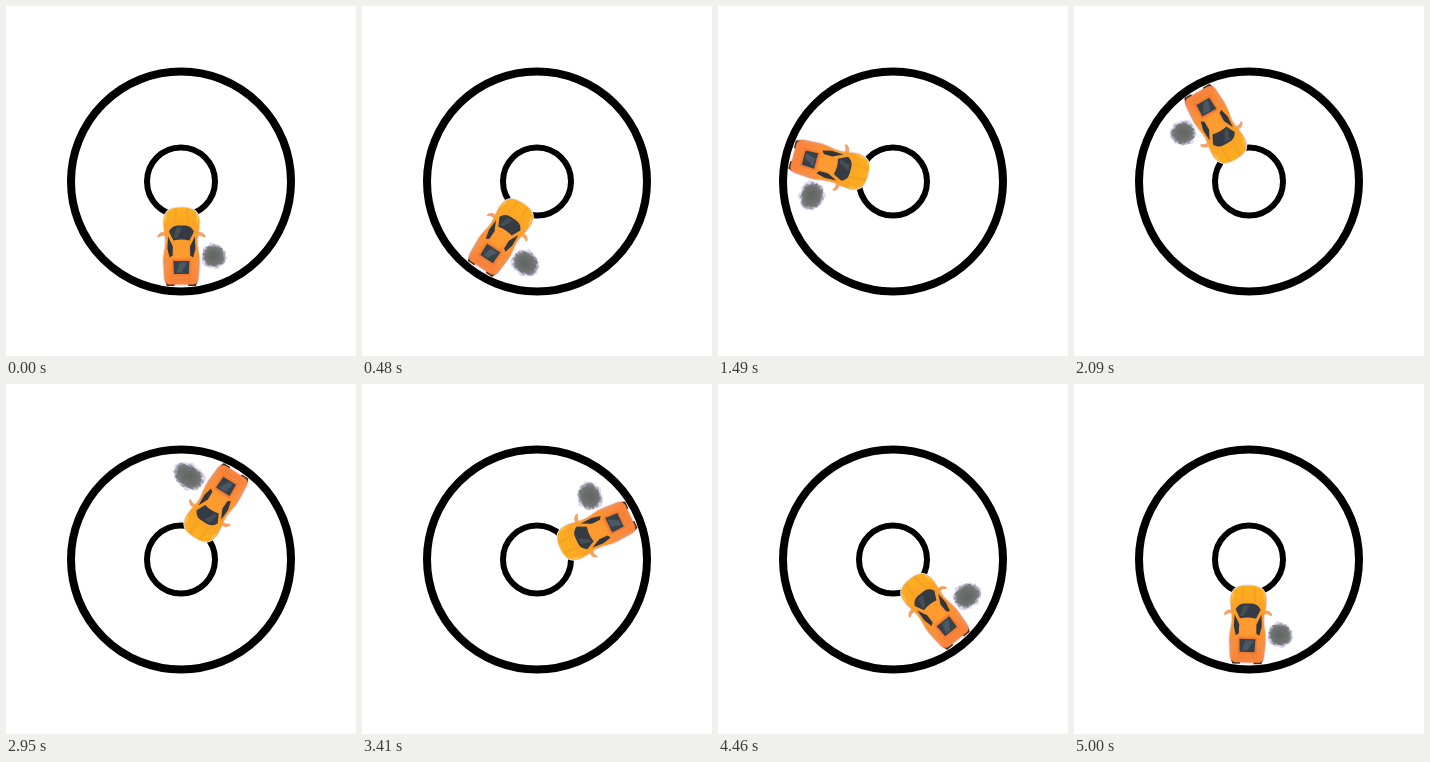
Write an HTML page with a canvas that moves like this. It is 350 px wide and 350 px high and loops after 5040 ms.

```html
<!DOCTYPE html>
<html>
<head>
<meta charset="utf-8">
<style>
html, body { margin: 0; width: 100%; height: 100%; overflow: hidden; background: #fff; }
canvas { display: block; width: 350px; height: 350px; }
</style>
</head>
<body>
<canvas id="stage" width="350" height="350"></canvas>
<script>
const ctx = document.getElementById('stage').getContext('2d');
const LOOP = 5040;
const SPEED = 72; // degrees per second, one puff per second

// time in ms, heading in degrees
const turns = [[0, 0], [1010, 70], [1490, 105.2], [2090, 150.3],
               [2950, 212], [3920, 281.2], [5000, 361.5]];

function heading(t) {
  if (t >= 5000) return 361.5;
  const i = turns.findIndex(k => k[0] > t);
  const [t0, a0] = turns[i - 1], [t1, a1] = turns[i];
  return a0 + (a1 - a0) * (t - t0) / (t1 - t0);
}

function ring(r, width) {
  ctx.beginPath();
  ctx.arc(0, 0, r, 0, Math.PI * 2);
  ctx.lineWidth = width;
  ctx.strokeStyle = '#000';
  ctx.stroke();
}

function fill(path, color) {
  ctx.fillStyle = color;
  ctx.fill(new Path2D(path));
}

// draws a path and its mirror image across the car's long axis
function pair(path, color) {
  fill(path, color);
  ctx.save();
  ctx.scale(-1, 1);
  fill(path, color);
  ctx.restore();
}

const body = new Path2D(
  'M0 26 C6 26 11 27 14 30 C18 34 18.5 40 17.5 47 C17 53 15.5 57 16 62 ' +
  'C16.5 69 18.5 74 18 82 L17 97 C16.5 101 14 103 11 103 L-11 103 ' +
  'C-14 103 -16.5 101 -17 97 L-18 82 C-18.5 74 -16.5 69 -16 62 ' +
  'C-15.5 57 -17 53 -17.5 47 C-18.5 40 -18 34 -14 30 C-11 27 -6 26 0 26 Z');

const paint = ctx.createLinearGradient(0, 26, 0, 103);
paint.addColorStop(0, '#fcb01f');
paint.addColorStop(0.4, '#fc9c2a');
paint.addColorStop(1, '#fb823c');

function car() {
  ctx.lineWidth = 2;
  ctx.strokeStyle = '#e6dcf0';
  ctx.stroke(body);
  pair('M15 50 L21 51 L24 54 L23.5 56.5 L20 54.5 L15 54 Z', '#f2a266');
  pair('M6 100 L16 100 L14.5 104.5 L7 104.5 Z', '#4b3026');
  ctx.fillStyle = paint;
  ctx.fill(body);
  pair('M4 27 L7 27 L8 43 L5.5 43 Z', '#f4a322');
  pair('M14.5 31 L17 36 L17 43 L14.5 37 Z', '#fdbe48');
  pair('M16.2 77 L17.5 82 L16.8 97 L14.8 99 L14.2 82 Z', '#f19055');
  fill('M-12.5 50 C-9 43.5 -5 44 0 44 C5 44 9 43.5 12.5 50 L8 59 Q0 57 -8 59 Z', '#343b42');
  fill('M-5 46 L1 46 L-4 56 L-8 57 Z', '#454e56');
  pair('M13.4 55 L14 67 L11.8 76 L8.8 74 L8.6 65 Z', '#30363b');
  fill('M-8 60 Q0 58 8 60 L7 76 L-7 76 Z', '#fd9a30');
  fill('M-9.5 77.5 L9.5 77.5 L10 95 L-10 95 Z', '#f37c34');
  fill('M-8 79.5 L8 79.5 L7.5 92.5 L-7.5 92.5 Z', '#38424b');
  fill('M-2 81 L6 81 L0 91 L-5 91 Z', '#4d5962');
  fill('M-9 97 L9 97 L10 99 L-10 99 Z', '#f08140');
}

// ragged blob with seeded spikes
function blob(size, rough, seed) {
  const p = new Path2D();
  for (let i = 0; i < 36; i++) {
    const n = Math.abs(Math.sin(seed + i * 78.233) * 43758.5) % 1;
    const r = size - rough * n, a = i / 36 * Math.PI * 2;
    p.lineTo(r * Math.cos(a), r * Math.sin(a));
  }
  p.closePath();
  return p;
}

const core = ctx.createRadialGradient(-1, 1, 1, 0, 0, 10);
core.addColorStop(0, '#626764');
core.addColorStop(0.6, '#6b706d');
core.addColorStop(1, '#747878');
const puffs = [
  [blob(14, 3, 1), '#dfd8ef'],
  [blob(12.8, 3, 4), '#a3a2b0'],
  [blob(11.4, 3, 7), '#787b7d'],
  [blob(9.8, 2, 9), core]
];

function smoke(phase) {
  ctx.save();
  ctx.translate(19.5, 74.5);
  ctx.scale(1 + 0.38 * phase, 1);
  ctx.translate(13, 0);
  for (const [path, color] of puffs) {
    ctx.fillStyle = color;
    ctx.fill(path);
  }
  ctx.restore();
}

function draw(now) {
  const angle = heading(now % LOOP);
  ctx.setTransform(1, 0, 0, 1, 0, 0);
  ctx.fillStyle = '#fff';
  ctx.fillRect(0, 0, 350, 350);
  ctx.translate(175, 175.5);
  ring(110, 8);
  ring(34, 6);
  ctx.rotate(angle * Math.PI / 180);
  ctx.translate(0.5, 0);
  smoke(angle / SPEED % 1);
  car();
}

const start = performance.now();
function tick() {
  draw(performance.now() - start);
  requestAnimationFrame(tick);
}
tick();
</script>
</body>
</html>
```
